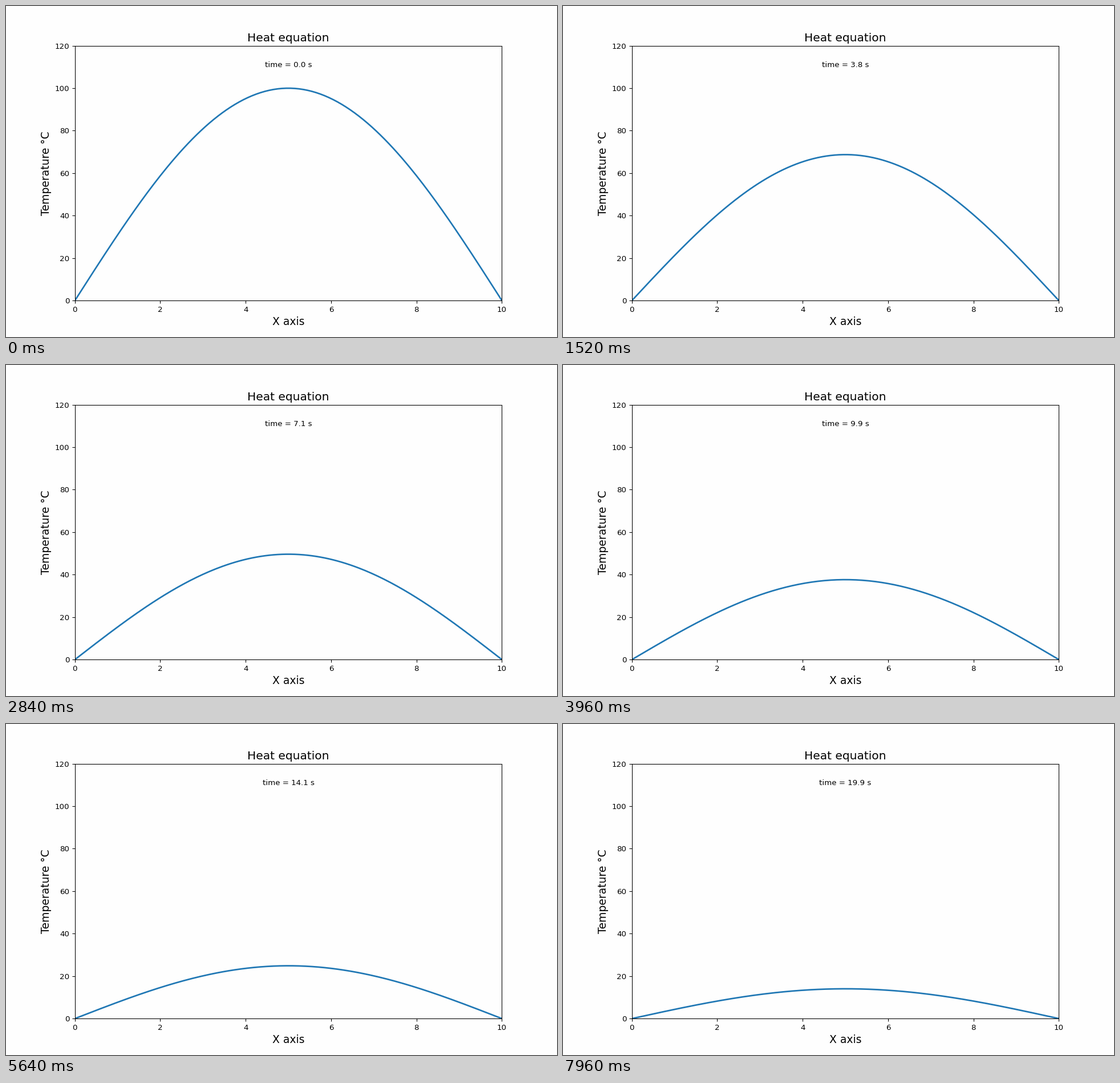
These frames come from a looping animation (966 px wide and 580 px high, 8000 ms). A matplotlib script:

```python
import numpy as np
import matplotlib.pyplot as plt
from matplotlib.animation import FuncAnimation

WIDTH, HEIGHT, DPI = 966, 580, 96.6
FRAMES, INTERVAL = 200, 40
LENGTH = 10.0        # rod length
PEAK = 100.0         # starting temperature at the middle
DIFFUSIVITY = 1.0
DT = 0.1             # simulated seconds per frame
PAPER = "#fefefe"

plt.rcParams["font.family"] = "DejaVu Sans"

x = np.linspace(0, LENGTH, 201)
mode = np.sin(np.pi * x / LENGTH)
rate = DIFFUSIVITY * (np.pi / LENGTH) ** 2

fig, ax = plt.subplots(figsize=(WIDTH / DPI, HEIGHT / DPI), dpi=DPI,
                       facecolor=PAPER)
ax.set_facecolor(PAPER)
ax.set_xlim(0, LENGTH)
ax.set_ylim(0, 120)
ax.set_title("Heat equation", fontsize=15)
ax.set_xlabel("X axis", fontsize=14)
ax.set_ylabel("Temperature °C", fontsize=14)

line, = ax.plot(x, PEAK * mode, color="#1f77b4", lw=2)
clock = ax.text(LENGTH / 2, 110, "", ha="center", fontsize=10)


def update(i):
    t = i * DT
    line.set_ydata(PEAK * np.exp(-rate * t) * mode)
    clock.set_text(f"time = {t:.1f} s")
    return line, clock


anim = FuncAnimation(fig, update, frames=FRAMES, interval=INTERVAL,
                     init_func=lambda: update(0), repeat=True, repeat_delay=0)
plt.show()
```
